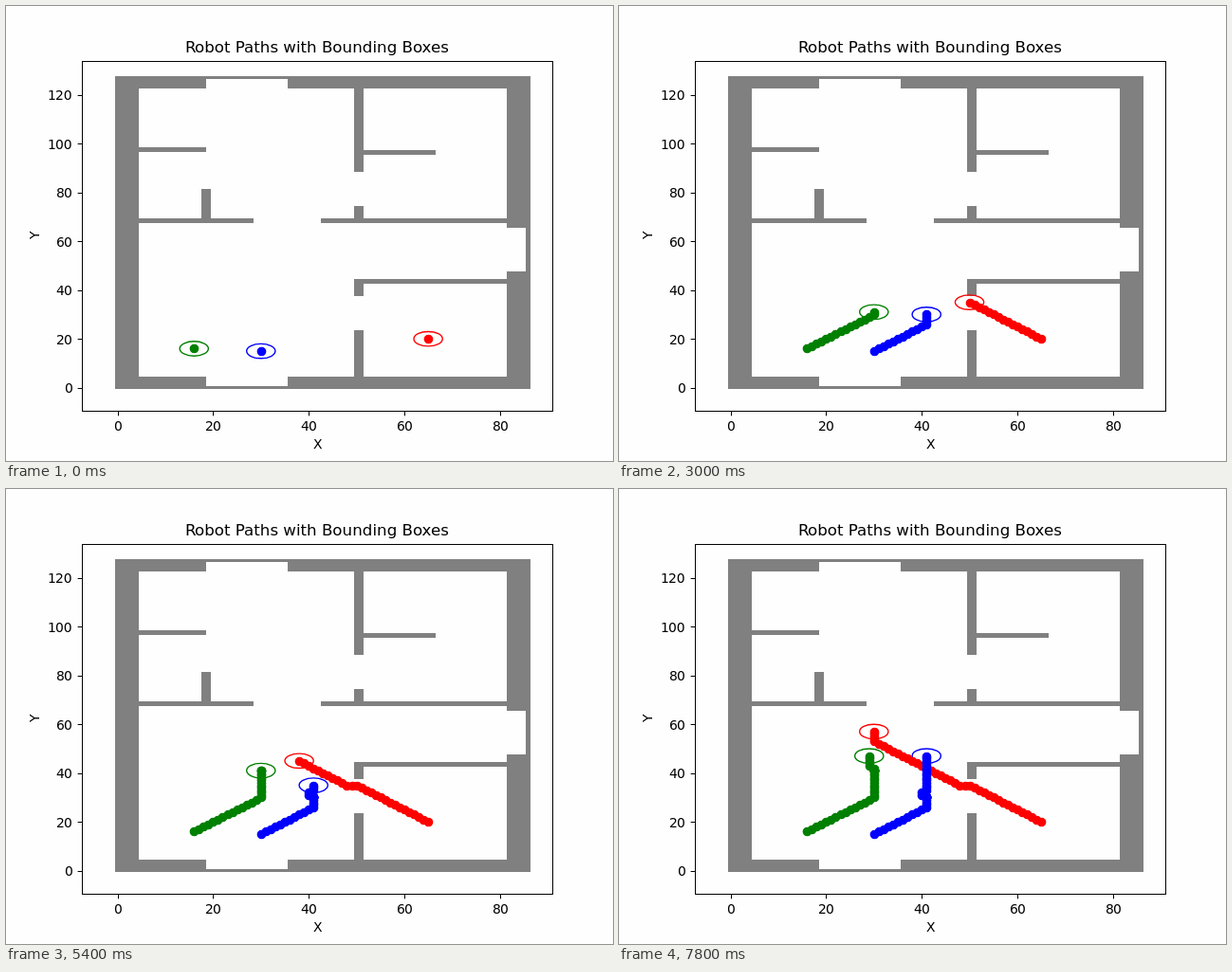
An HTML page with a canvas that plays this animation: 640x480 px, repeating every 8000 ms.

```html
<!DOCTYPE html>
<html lang="en">
<head>
<meta charset="utf-8">
<title>Robot Paths</title>
<style>
html, body { margin: 0; width: 100%; height: 100%; overflow: hidden; background: #fefefe; }
canvas { display: block; }
</style>
</head>
<body>
<canvas id="stage" width="640" height="480"></canvas>
<script>
const ctx = document.getElementById('stage').getContext('2d');
const STEP = 200, STEPS = 40;
const PT = 100 / 72;
const PAPER = '#fefefe', WALL = '#808080';
const DOOR = 14, THICK = 2, BORDER = 5;
const AXES = { left: 80, right: 576, top: 58, bottom: 427 };

// Data units to pixels
const SX = 450.909 / 89.5, SY = 336 / 130.5;
const px = x => 102.545 + (x + 3) * SX;
const py = y => 410.4 - (y + 3) * SY;

// Robots head for each goal in turn and may pause at the first
const ROBOTS = [
  { color: '#ff0000', start: [65, 20], goals: [[48, 35], [30, 57]], pause: 0 },
  { color: '#0000ff', start: [30, 15], goals: [[41, 30], [40, 32], [41, 47]], pause: 7 },
  { color: '#008000', start: [16, 16], goals: [[30, 41], [30, 42], [29, 47]], pause: 8 }
];

function walk({ start, goals, pause }) {
  let [x, y] = start;
  const path = [start];
  goals.forEach(([gx, gy], i) => {
    while (x !== gx || y !== gy) {
      x += Math.sign(gx - x);
      y += Math.sign(gy - y);
      path.push([x, y]);
    }
    if (i === 0) for (let n = 0; n < pause; n++) path.push([x, y]);
  });
  return path;
}
for (const robot of ROBOTS) robot.path = walk(robot);

function block(x, y, w, h, color = WALL) {
  const [l, r] = [x, x + w].map(v => Math.round(px(v - 0.5)));
  const [b, t] = [y, y + h].map(v => Math.round(py(v - 0.5)));
  ctx.fillStyle = color;
  ctx.fillRect(l, t, r - l, b - t);
}
const clear = (x, y, w, h) => block(x, y, w, h, PAPER);
const across = (y, x0, x1) => block(x0, y, x1 - x0, THICK);
const upright = (x, y0, y1) => block(x, y0, THICK, y1 - y0);

function drawMap() {
  const right = 82, top = 123, middle = 50;
  block(0, 0, right + BORDER, top + BORDER);
  clear(BORDER, BORDER, right - BORDER, top - BORDER);
  for (const y of [1, top]) clear(19, y, 17, BORDER - 1);
  clear(right, 48, BORDER - 1, 18);

  across(68, BORDER, right);
  across(43, middle, right);
  across(97, BORDER, 19);
  across(96, middle, 67);
  upright(18, 68, 82);
  upright(middle, BORDER, 43);
  upright(middle, 68, top);
  clear(29, 68, DOOR, THICK);
  for (const y of [24, 75]) clear(middle, y, THICK, DOOR);
}

function line(x0, y0, x1, y1) {
  ctx.beginPath();
  ctx.moveTo(x0, y0);
  ctx.lineTo(x1, y1);
  ctx.stroke();
}

// Glyph advances and bearings sit on an eighth-pixel grid, the ink on whole pixels
function text(str, x, y, align, size = 10) {
  const em = size * PT;
  const snap = v => Math.round(v * em / 125) / 8;
  const width = s => ctx.measureText(s).width;
  ctx.font = '1000px "DejaVu Sans", sans-serif';
  const bearing = snap(-ctx.measureText(str[0]).actualBoundingBoxLeft);
  const pens = [0];
  for (let i = 0; i < str.length; i++) {
    const next = str[i + 1] || '';
    pens.push(pens[i] + snap(width(str[i] + next) - width(next)));
  }
  const ink = Math.round(x - pens[str.length] * align + bearing);
  ctx.font = `${em}px "DejaVu Sans", sans-serif`;
  [...str].forEach((ch, i) => {
    const offset = i ? Math.ceil(bearing) : Math.floor(bearing);
    ctx.fillText(ch, ink - offset + pens[i], y);
  });
}

function drawAxes() {
  const { left, right, top, bottom } = AXES;
  const tick = 3.5 * PT;
  ctx.strokeStyle = ctx.fillStyle = '#000';
  ctx.lineWidth = 1;
  ctx.strokeRect(left + 0.5, top + 0.5, right - left, bottom - top);
  for (let v = 0; v <= 120; v += 20) {
    const y = Math.round(py(v)) + 0.5;
    line(left + 0.5, y, left + 0.5 - tick, y);
    text(String(v), 70.28, Math.round(py(v) + 5.5), 1);
    if (v > 80) continue;
    const x = Math.round(px(v)) + 0.5;
    line(x, bottom + 0.5, x, bottom + 0.5 + tick);
    text(String(v), px(v), 448, 0.5);
  }
  text('Robot Paths with Bounding Boxes', 328, 49, 0.5, 12);
  text('X', 328, 467, 0.5);
  ctx.save();
  ctx.translate(35, 480);
  ctx.rotate(-Math.PI / 2);
  text('Y', 237.6, 0, 0.5);
  ctx.restore();
}

function drawBox({ color, path }, step) {
  const [x, y] = path[step];
  ctx.strokeStyle = color;
  ctx.beginPath();
  ctx.ellipse(px(x), py(y), 3 * SX, 3 * SY, 0, 0, Math.PI * 2);
  ctx.stroke();
}

function drawDot({ color, path }, step) {
  const [x, y] = path[step];
  ctx.fillStyle = ctx.strokeStyle = color;
  ctx.beginPath();
  ctx.arc(Math.round(px(x)) + 0.5, Math.round(py(y)) + 0.5, 3 * PT, 0, Math.PI * 2);
  ctx.fill();
  ctx.stroke();
}

function draw(time) {
  const step = Math.floor(time / STEP) % STEPS;
  ctx.fillStyle = PAPER;
  ctx.fillRect(0, 0, 640, 480);
  drawMap();
  ctx.lineWidth = PT;
  for (const robot of ROBOTS) drawBox(robot, step);
  for (let i = 0; i <= step; i++) {
    for (const robot of ROBOTS) drawDot(robot, i);
  }
  drawAxes();
}

const begin = performance.now();
function loop() {
  draw(performance.now() - begin);
  requestAnimationFrame(loop);
}
loop();
</script>
</body>
</html>
```
